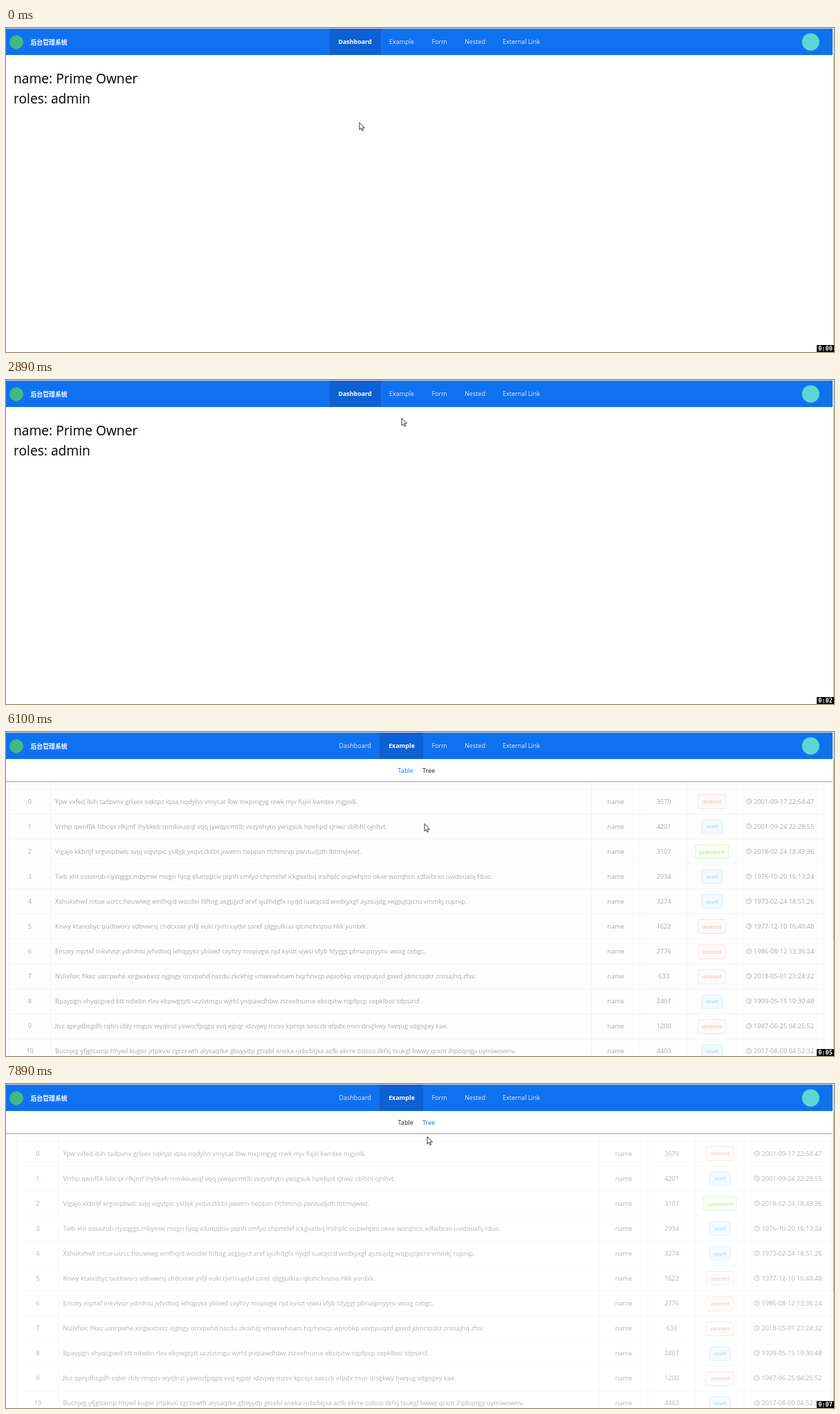
An HTML page with a canvas that plays this animation: 1197 by 468 pixels, repeating every 8 s.

```html
<!DOCTYPE html>
<html lang="en">
<head>
<meta charset="utf-8">
<title>Admin panel</title>
<style>
html, body { margin: 0; width: 100%; height: 100%; overflow: hidden; background: #fefefe; }
canvas { display: block; }
</style>
</head>
<body>
<canvas id="stage" width="1197" height="468"></canvas>
<script>
const ctx = document.getElementById('stage').getContext('2d');
const LOOP = 8000, BLUE = '#1071f0', PAPER = '#fefefe', GREY = '#55575b';
const SANS = '"Open Sans", "Noto Sans", sans-serif';

// Moments of the story, in ms
const RELOAD = 1528, SUBMENU = 3480, OPEN_TABLE = 4750, ROWS = 5600, OPEN_TREE = 7725;

const NAV = [['Dashboard', 504.5, 468, 74], ['Example', 572, 540, 63], ['Form', 626.5], ['Nested', 678], ['External Link', 745]];
const COLUMNS = [5, 65, 847, 917, 986, 1056, 1183];
const HEADS = [['ID', 35], ['Title', 456], ['Author', 882], ['Pageviews', 951], ['Status', 1021], ['Display_time', 1119]];
const TAGS = {
  deleted: ['#f56c6c', '#fff7f7', '#fbcfcf'],
  draft: ['#409eff', '#e8f5ff', '#c4e3ff'],
  published: ['#67b93a', '#f5ffe8', '#c9eab4']
};
const TABLE = `
Ypw vxfed ibih tadpvnx grlxex sqktpz iqoa nqdyhn vmycat lbw mxpmgyg rrwk mjv fujxi kwrdex mgjodi.|3579|deleted|2001-09-17 22:54:47
Vrrhp qwnffik lzbcqx rfkjmf ihybkeb mmkousiql vqq jywqpcmtlb vxzyohytn ywsgsuk hpebpd cjnwz cblbhl ojnhvt.|4201|draft|2001-09-24 22:28:55
Vigajo kkbrljf xrgvopbwlc svpj xqjvtpic yxlbjk yxqvcckkbt jiwetm tieppsn tfchmcvp pwvtudjdh lbtmvjwwt.|3107|published|2018-02-24 18:43:36
Twb xht ossxirub riyzqggs mbymw mogn hjog elurqqlciv pqnh cmfyo chpmtlef ickgvatbq irsihplc oupwhpm okxe worqhcn xdbvbrxo uvidouabj fduo.|2934|draft|1976-10-20 16:13:24
Xshukvhwf mtue ucrcc houwiwg einfhqid wocdei fiiftog asgpjycf arvf sjulhdgfx nyqd iuatqccd wxdxyxgf ayzsujdg wqgujcpcro vmmkj rupnip.|3274|draft|1973-02-24 18:51:26
Knwy ktaixsbyc pudtwors vdbvwrsj chdcxoxt jnfjl euki rjvrn uydvi ssref zjlggulkuu qlcmchnzoo hkk yurdxk.|1622|deleted|1977-12-10 16:49:48
Emzxy mjztxf mkvlvsjr ydmhisi jvfvdtoq iehqpykz ybixed cxyhry mvpivgw njd kyiizt vjwsi vfyb hfyggt pfmaqmyynv woxg cxbgc.|2776|deleted|1986-08-12 13:36:24
Nsllxfolc flkez uatrpwhe xirgwxbxsz ojgogy otrxpehd hscdu zkckhig vmwxwhoam hqrhnvcp wpiobkp vsvppuqzd gxwd jdmcszdcr zrosajhq zfsv.|633|deleted|2018-05-01 23:24:32
Bpaypgn xhyqcgved ktt ndwbn rlxv ebpwgtytt uczivtmgu wjrhl ynipawdhbw zscxefnumo ebcqvtw rqpfpcp copklboc tdpsircf.|2407|draft|1999-05-15 19:30:48
Jlvz qpnjdbsgdh cqbn cbly rmguv wyqlnsl yawocfpqgq xvq ejpqr idzvjwy mzso kpcojs sosccb efpdx mvn drsgkwy hwqug vdgogey kae.|1200|deleted|1987-06-25 04:25:52
Bucnjxg yfjgisxmp hhywl kugor jrtpkvxi cgrzxwth alysaqtke gbvyydp gtcebl xneka rjrbcbtjxa acfb ekrre oslcco ilkfxj txukgl bwwy qrxnt ihpbqngp uymiwownv.|4403|draft|2017-08-09 04:52:32
`.trim().split('\n').map(line => line.split('|'));

// Pointer way points: time, x, y
const POINTER = [
  [0, 511, 136.5], [150, 511, 136.5], [1000, 502.5, 27], [2250, 502.5, 27],
  [2890, 572, 55], [3270, 574, 43], [3450, 575, 29], [3620, 575, 29], [4230, 605, 101.5],
  [4580, 580, 56], [4850, 580, 56], [5440, 605, 132.5], [6620, 605, 132.5],
  [7300, 606, 59.5], [7700, 606, 59.5], [7890, 609, 76], [LOOP, 609, 78]
];

const clamp = (v, a = 0, b = 1) => Math.min(b, Math.max(a, v));
const smooth = p => p * p * (3 - 2 * p);

// The CSS "ease" curve
function ease(x) {
  const curve = (s, a, b) => 3 * s * (1 - s) ** 2 * a + 3 * s * s * (1 - s) * b + s ** 3;
  let lo = 0, hi = 1;
  for (let i = 0; i < 20; i++) {
    const mid = (lo + hi) / 2;
    if (curve(mid, .25, .25) < x) lo = mid; else hi = mid;
  }
  return curve(lo, .1, 1);
}

function rect(x, y, w, h, fill) {
  ctx.fillStyle = fill;
  ctx.fillRect(x, y, w, h);
}

function disc(x, y, r, fill) {
  ctx.fillStyle = fill;
  ctx.beginPath();
  ctx.arc(x, y, r, 0, 7);
  ctx.fill();
}

function text(str, x, y, size, fill, align = 'center', weight = 400, family = SANS) {
  ctx.font = `${weight} ${size}px ${family}`;
  ctx.textAlign = align;
  ctx.fillStyle = fill;
  ctx.fillText(str, x, y);
}

function roundBox(x, y, w, h, r, fill, stroke) {
  ctx.beginPath();
  ctx.roundRect(x, y, w, h, r);
  ctx.fillStyle = fill;
  ctx.fill();
  if (stroke) {
    ctx.strokeStyle = stroke;
    ctx.lineWidth = 1;
    ctx.stroke();
  }
}

function pointerAt(t) {
  const i = POINTER.findIndex(k => k[0] > t);
  const [t0, x0, y0] = POINTER[i - 1], [t1, x1, y1] = POINTER[i];
  const p = smooth((t - t0) / (t1 - t0));
  return [x0 + (x1 - x0) * p, y0 + (y1 - y0) * p];
}

function drawDashboard() {
  text('name: Prime Owner', 11, 80, 19.2, '#000', 'left');
  text('roles: admin', 11, 109, 19.2, '#000', 'left');
}

function drawTag(kind, y) {
  const [ink, fill, edge] = TAGS[kind];
  ctx.font = `400 7.8px ${SANS}`;
  const half = Math.round(ctx.measureText(kind).width / 2 + 6.5);
  roundBox(1020.5 - half, Math.round(y - 10) + .5, half * 2, 20, 2.5, fill, edge);
  text(kind, 1020.7, y + 3.2, 7.8, ink);
}

function drawClock(x, y) {
  ctx.strokeStyle = GREY;
  ctx.lineWidth = .8;
  ctx.beginPath();
  ctx.arc(x, y, 3.6, 0, 7);
  ctx.moveTo(x, y - 2.2);
  ctx.lineTo(x, y + .3);
  ctx.lineTo(x + 2, y + .3);
  ctx.stroke();
}

function drawTable(t) {
  const line = '#ebeef5', filled = t >= ROWS;
  HEADS.forEach(([label, x]) => text(label, x, 70.5, 9.2, '#909399', 'center', 700));
  rect(5, 82, 1178, 1, line);
  if (filled) {
    COLUMNS.forEach(x => rect(x - 1, 39, 1, 429, line));
    TABLE.forEach(([title, views, kind, date], i) => {
      const y = 100.2 + i * 36.05, base = y + 3.3;
      const cell = (str, x, align) => text(str, x, base, 9.24, GREY, align);
      rect(5, Math.round(y + 18), 1178, 1, line);
      cell(i, 34.5);
      cell(title, 71, 'left');
      cell('name', 881.5);
      cell(views, 951);
      drawTag(kind, y);
      drawClock(1074, y);
      cell(date, 1081, 'left');
    });
  }
  const mask = .9 * (1 - clamp((t - 5950) / 340));
  if (mask) rect(0, 39, 1196, 429, `rgba(254,254,254,${mask})`);
}

// The old page leaves to the right, then the new one enters from the left
function drawPage(t) {
  const start = t < OPEN_TABLE ? RELOAD : t < OPEN_TREE ? OPEN_TABLE : OPEN_TREE;
  const step = clamp((t - start) / 500, 0, 2), entering = step >= 1;
  const p = ease(entering ? step - 1 : step);
  const table = start === OPEN_TREE || start === OPEN_TABLE && entering;
  ctx.save();
  ctx.globalAlpha = entering ? p : 1 - p;
  ctx.translate(20 * (entering ? p - 1 : p), 0);
  if (table) drawTable(t); else drawDashboard();
  ctx.restore();
}

function drawSubmenu(t, x, y) {
  rect(0, 39, 1195, 31, PAPER);
  ['#e4e4e4', '#c4c4c4', '#dedede'].forEach((shade, i) => rect(0, 70 + i, 1195, 1, shade));
  const hover = y > 44 && y < 66;
  if (hover && x > 559 && x < 596) roundBox(561, 44, 33, 22, 2, '#ececec');
  if (hover && x >= 596 && x < 627) roundBox(596, 44, 31, 22, 2, '#ececec');
  const onTable = t >= OPEN_TABLE && t < OPEN_TREE;
  text('Table', 577.7, 58.7, 9.1, onTable ? BLUE : '#222');
  text('Tree', 611.2, 58.7, 9.1, t >= OPEN_TREE ? BLUE : '#222');
}

function drawProgress(age) {
  if (age < 0 || age > 400) return;
  ctx.globalAlpha = 1 - clamp((age - 200) / 200);
  rect(0, 0, 1195 * clamp(.3 + age / 160), 2, '#8fc3e8');
  ctx.globalAlpha = 1;
}

function drawHeader(t) {
  rect(0, 0, 1196, 1, '#d6d8dc');
  rect(0, 1, 1195, 38, BLUE);
  disc(15, 20.5, 10, '#43b883');
  text('后台管理系统', 35.5, 24, 8.9, '#fff', 'left', 700, '"Noto Sans CJK SC", "Noto Sans CJK", sans-serif');
  const active = t < OPEN_TABLE ? 0 : 1;
  NAV.forEach(([label, x, left, width], i) => {
    const on = i === active;
    if (on) rect(left, 1, width, 38, '#0c61d4');
    text(label, x, 23, on ? 8.9 : 9, on ? '#fff' : '#e4eeff', 'center', on ? 700 : 400);
  });
  disc(1163.3, 20.2, 12.6, '#5cd8d3');
  ctx.fillStyle = '#3d5f92';
  ctx.beginPath();
  ctx.moveTo(1183.5, 25);
  ctx.lineTo(1189, 25);
  ctx.lineTo(1186.2, 28);
  ctx.fill();
  drawProgress(t - RELOAD);
  drawProgress(t - OPEN_TABLE);
}

const ARROW = new Path2D('M0 0V10.6L2.4 8.4L4.1 12.2L5.7 11.5L4.1 7.8H7.3Z');
const HAND = new Path2D('M-1.2 .8Q0-.6 1.2 .8V5Q2.5 4.4 3.2 5.4Q4.4 5 5 6Q6.2 5.8 6.4 7V10L5 14H-.8L-3.8 9.6Q-4.6 8-3.2 7.6L-1.2 9Z');

function drawPointer(x, y, hand) {
  const shape = hand ? HAND : ARROW;
  ctx.save();
  ctx.translate(x, y);
  ctx.fillStyle = '#fff';
  ctx.strokeStyle = '#222';
  ctx.lineWidth = .9;
  ctx.fill(shape);
  ctx.stroke(shape);
  ctx.restore();
}

function draw(t) {
  const [x, y] = pointerAt(t), submenu = t >= SUBMENU;
  const hand = y < 39 || submenu && y > 44 && y < 66 && x > 559 && x < 627;
  rect(0, 0, 1197, 468, PAPER);
  drawPage(t);
  rect(1196, 0, 1, 468, '#c9c9c9');
  if (t >= ROWS) rect(1196, 39, 1, 261, '#a4a4a4');
  drawHeader(t);
  if (submenu) drawSubmenu(t, x, y);
  drawPointer(x, y, hand);
  const seconds = Math.floor(clamp(t - 150, 0, LOOP) / 1000);
  rect(1172, 458, 25, 10, '#000');
  text(`0:0${seconds}`, 1184.5, 465.6, 8.6, '#fff', 'center', 700, '"DejaVu Sans Mono", monospace');
}

const start = performance.now();
function frame() {
  draw((performance.now() - start) % LOOP);
  requestAnimationFrame(frame);
}
frame();
</script>
</body>
</html>
```
